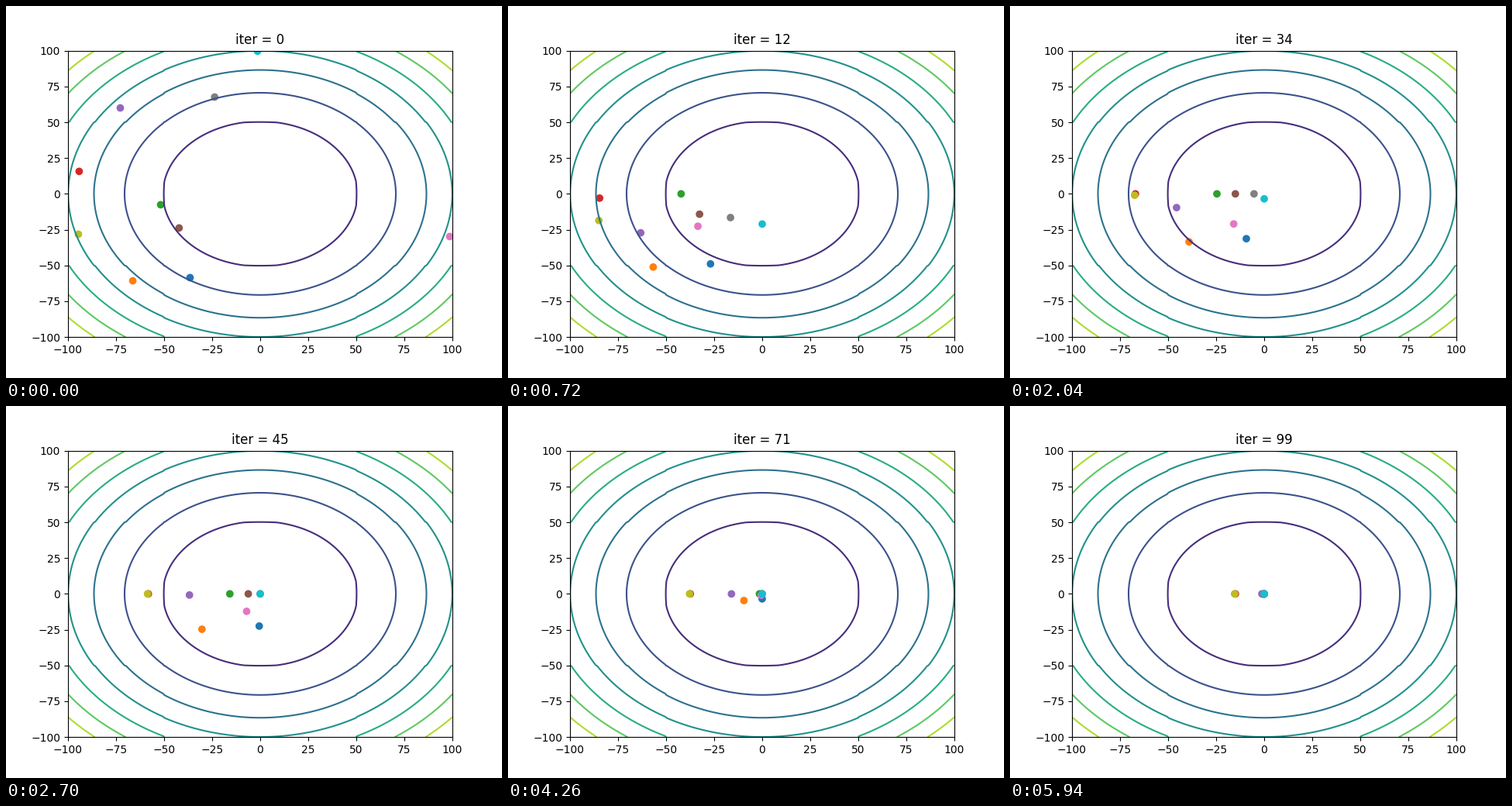
Animation, 640 px wide and 480 px high, one loop 6000 ms. Source, as a matplotlib script:

```python
import numpy as np
import matplotlib.pyplot as plt
from matplotlib.animation import FuncAnimation

FRAMES = 100
INTERVAL = 60
SPEED = 0.8       # largest step per iteration
EASE = 0.1        # late steps shrink with the remaining distance
EASE_FROM = 45
PAUSE_FROM = 10

START = np.array([
    (-36.5, -58.5), (-66.3, -60.7), (-51.8, -7.6), (-94.2, 15.7),
    (-72.8, 60.0), (-42.2, -23.8), (98.6, -29.8), (-23.7, 67.6),
    (-94.6, -28.2), (-1.4, 99.6),
])
PAUSE_UNTIL = {(6, 1): 33, (7, 0): 21}  # (particle, axis): iteration


def rebound(pos):
    """Throw positive coordinates across zero, later particles less far."""
    strength = 3 / np.arange(1, len(pos) + 1)[:, None]
    return np.where(pos > 0, -strength * pos, pos + SPEED)


def simulate():
    path = [START, rebound(START)]
    for i in range(2, FRAMES):
        gap = -path[-1]
        step = np.minimum(SPEED, EASE * gap if i > EASE_FROM else gap)
        for key, until in PAUSE_UNTIL.items():
            if PAUSE_FROM <= i < until:
                step[key] = 0
        path.append(path[-1] + step)
    return path


def bowl(v):
    """Parabola with a small jump at |v| = 50."""
    return v ** 2 + 10 + 40 * np.sign(np.abs(v) - 50)


path = simulate()

fig, ax = plt.subplots(figsize=(6.4, 4.8), dpi=100)
x, y = np.meshgrid(np.linspace(-100, 100, 400), np.linspace(-100, 100, 400))
ax.contour(x, y, bowl(x) + bowl(y), levels=np.arange(2500, 20000, 2500),
           cmap="viridis", vmin=0, vmax=20000)
dots = ax.scatter(*START.T, c=[f"C{k}" for k in range(len(START))])
ax.set_xlim(-100, 100)
ax.set_ylim(-100, 100)
title = ax.set_title("iter = 0")


def update(i):
    dots.set_offsets(path[i])
    title.set_text(f"iter = {i}")
    return dots, title


anim = FuncAnimation(fig, update, frames=FRAMES, interval=INTERVAL,
                     repeat=True, repeat_delay=0)
plt.show()
```
